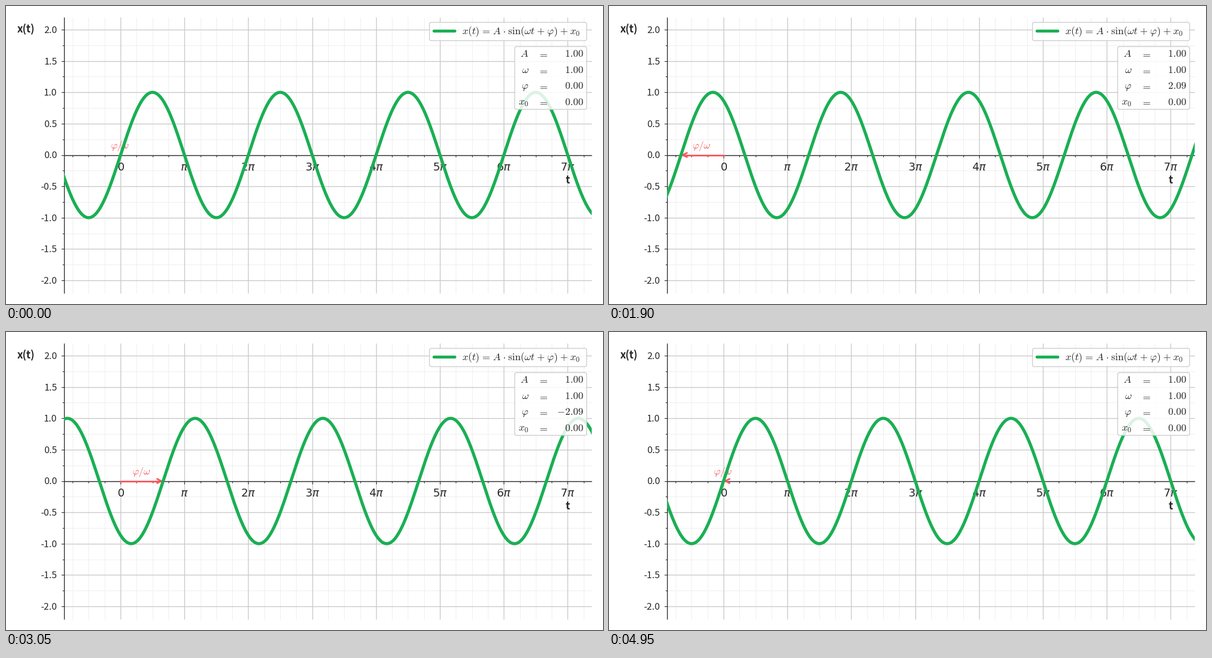
These frames come from a looping animation (1058x529 px, 5000 ms). A matplotlib script:

```python
import numpy as np
import matplotlib.pyplot as plt
from matplotlib.animation import FuncAnimation
from matplotlib.patches import FancyBboxPatch, Rectangle

W, H, DPI = 1058, 529, 100
FRAMES, INTERVAL = 100, 50
PT = 72 / DPI                                  # points per pixel
LEFT, RIGHT, TOP, BOTTOM = 103, 1038, 20, 510
X0, Y0 = 203, 264.5                            # position of the data origin
STEP_X, STEP_Y = 113.21, 111.25                # pixels per pi and per unit

INK, GREEN, RED = "#262626", "#1aaf54", "#fa575d"
MAJOR, MINOR = "#c8c8c8", "#eeeeee"
SANS = "Noto Sans CJK JP"

fig = plt.figure(figsize=(W / DPI, H / DPI), dpi=DPI, facecolor="white")
ax = fig.add_axes([0, 0, 1, 1])
ax.set_xlim(0, W)
ax.set_ylim(H, 0)
ax.axis("off")


def px(t):
    return X0 + t / np.pi * STEP_X


def py(x):
    return Y0 - x * STEP_Y


def line(xs, ys, color, width, z, cap="butt"):
    return ax.plot(xs, ys, color=color, lw=width * PT, zorder=z,
                   solid_capstyle=cap, solid_joinstyle="round")[0]


def text(x, y, s, size, z=2, ha="center", color=INK, **kw):
    return ax.text(x, y, s, fontsize=size * PT, ha=ha, va="baseline",
                   color=color, zorder=z, **kw)


def tex(x, y, s, z=7, ha="left", color=INK):
    return text(x, y, f"${s}$", 18.06, z, ha, color, math_fontfamily="cm")


def box(x0, y0, x1, y1):
    ax.add_patch(FancyBboxPatch(
        (x0, y0), x1 - x0, y1 - y0, boxstyle="round,pad=0,rounding_size=3.6",
        fc=(1, 1, 1, 0.85), ec="#cccccc", lw=1.39 * PT, zorder=6))


def draw_axes():
    for k in range(-3, 30):
        x, major = X0 + k * STEP_X / 4, k % 4 == 0
        line([x, x], [TOP, BOTTOM], MAJOR if major else MINOR,
             1.39 if major else 1, 1 if major else 0.5)
        line([x, x], [Y0, Y0 + (5.4 if major else 3.8)], INK, 1.1, 2)
        if major:
            n = k // 4
            label = "0" if n == 0 else (str(n) if n > 1 else "") + r"\pi"
            text(x, 292, f"${label}$", 19.4, math_fontfamily="dejavusans")
    for k in range(-8, 9):
        y, major = py(k / 4), k % 2 == 0
        line([LEFT, RIGHT], [y, y], MAJOR if major else MINOR,
             1.39 if major else 1, 1 if major else 0.5)
        line([LEFT - (5.4 if major else 3.3), LEFT], [y, y], INK, 1.1, 2)
        if major:
            text(90.5, y + 6, f"{k / 4:.1f}", 16.67, ha="right", family=SANS)
    line([LEFT, LEFT], [TOP, BOTTOM], INK, 1.39, 2.5)
    line([LEFT, RIGHT], [Y0, Y0], INK, 1.39, 2.5)
    text(35, 47, "x(t)", 18.06, family=SANS, weight="bold")
    text(995.5, 315, "t", 18.06, family=SANS, weight="bold")


def draw_legend():
    box(750.5, 29, 1029, 61.5)
    line([757.5, 794.5], [44, 44], GREEN, 5.2, 7, "round")
    rel, gap = r"\hspace{0.116}", r"\hspace{0.053}"
    plus = gap + "+" + gap
    tex(808.5, 50.5, "x(t)" + rel + "=" + rel + "A" + gap + r"\cdot" + gap
        + r"\sin(\omega t" + plus + r"\varphi)" + plus + "x_0")
    box(901.5, 72, 1029, 183.5)
    rows = [("A", "1.00"), (r"\omega", "1.00"), (r"\varphi", "0.00"), ("x_0", "0.00")]
    cells = []
    for i, (name, value) in enumerate(rows):
        y = 90.3 + 28.4 * i
        tex(926.5, y, name, ha="right")
        tex(951.5, y, "=", ha="center")
        cells.append(tex(1023, y, value, ha="right"))
    return cells[2]


draw_axes()
phase_cell = draw_legend()

t = np.linspace(-2.9, 23.4, 1000)
curve = line(px(t), py(np.sin(t)), GREEN, 5.5, 4)
curve.set_clip_path(Rectangle((LEFT, TOP), RIGHT - LEFT, BOTTOM - TOP,
                              transform=ax.transData))
shaft = line([], [], RED, 2.9, 3, "round")
head = line([], [], RED, 2.9, 3, "round")
ratio = tex(X0, 252.5, r"\varphi/\omega", 3, "center", RED)


def update(i):
    phi = np.pi * np.sin(2 * np.pi * i / (FRAMES - 1))
    curve.set_ydata(py(np.sin(t + phi)))
    phase_cell.set_text(f"${phi:.2f}$")

    tip = px(-phi)
    side = -np.sign(phi)
    apex = tip - 3.2 * side
    back = apex - 7.5 * side
    shaft.set_data([X0, apex], [Y0, Y0])
    head.set_data([back, apex, back], [Y0 - 3.75, Y0, Y0 + 3.75])
    shaft.set_visible(abs(phi) > 0.1)
    head.set_visible(i > 0)
    ratio.set_x((X0 + tip) / 2 - 1)
    return curve, phase_cell, shaft, head, ratio


anim = FuncAnimation(fig, update, frames=FRAMES, interval=INTERVAL,
                     repeat=True, repeat_delay=0, blit=False)
plt.show()
```
